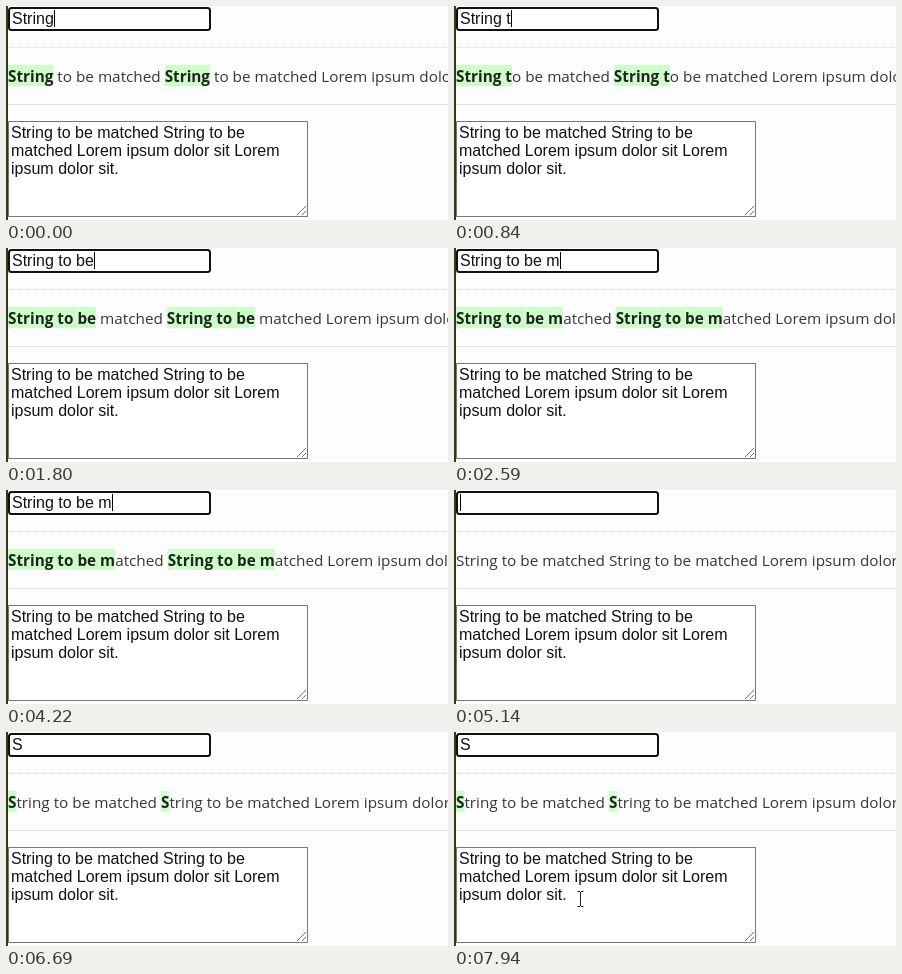
An HTML page with a canvas that plays this animation: 442 by 214 pixels, repeating every 7990 ms.

```html
<!DOCTYPE html>
<html lang="en">
<head>
<meta charset="utf-8">
<title>Live text highlight</title>
<style>
  html, body { margin: 0; width: 100%; height: 100%; overflow: hidden; background: #fdfcfe; }
  canvas { display: block; }
</style>
</head>
<body>
<canvas id="stage" width="442" height="214"></canvas>
<script>
const ctx = document.getElementById('stage').getContext('2d');
const W = 442, H = 214, LOOP = 7990, BLINK = 544;
const FIELD_FONT = '16px "Liberation Sans", Arial, sans-serif';
const PLAIN = '15.3px "Open Sans", sans-serif';
const BOLD = 'bold ' + PLAIN;
const TEXT = 'String to be matched String to be matched Lorem ipsum dolor sit Lorem ipsum dolor sit.';
const AREA_LINES = ['String to be matched String to be', 'matched Lorem ipsum dolor sit Lorem', 'ipsum dolor sit.'];

// Each keystroke: time and resulting field value
const KEYS = [
  [0, 'String'], [126, 'String '], [790, 'String t'], [1020, 'String to'],
  [1260, 'String to '], [1440, 'String to b'], [1710, 'String to be'],
  [1966, 'String to be '], [2590, 'String to be m'], [5140, ''], [6145, 'S']
];
const SELECT_FROM = 4560, SELECT_TO = 5140;

// Pointer path: time, x, y
const PATH = [[6980, 36, 214], [7140, 66, 198], [7300, 98, 180], [7480, 116, 172], [7939, 116, 172], [7940, 127, 167]];

function rect(color, x, y, w, h) {
  ctx.fillStyle = color;
  ctx.fillRect(x, y, w, h);
}

function write(str, x, y, font, color) {
  ctx.font = font;
  ctx.fillStyle = color;
  ctx.fillText(str, x, y);
  return ctx.measureText(str).width;
}

function line(color, width, ...points) {
  ctx.strokeStyle = color;
  ctx.lineWidth = width;
  ctx.beginPath();
  for (let i = 0; i < points.length; i += 4) {
    ctx.moveTo(points[i], points[i + 1]);
    ctx.lineTo(points[i + 2], points[i + 3]);
  }
  ctx.stroke();
}

function dottedRule(y, color) {
  ctx.setLineDash([1, 1]);
  line(color, 1, 2, y + 0.5, W, y + 0.5);
  ctx.setLineDash([]);
}

function roundBox(x, y, w, h, r, stroke, width) {
  ctx.beginPath();
  ctx.roundRect(x, y, w, h, r);
  ctx.fillStyle = '#fff';
  ctx.fill();
  ctx.strokeStyle = stroke;
  ctx.lineWidth = width;
  ctx.stroke();
}

function drawField(t, value, typedAt) {
  roundBox(3, 2, 201, 22, 2.5, '#111', 2);
  ctx.font = FIELD_FONT;
  const width = ctx.measureText(value).width;
  const selected = t >= SELECT_FROM && t < SELECT_TO;
  if (selected) rect('#0078d7', 6, 4, Math.round(width), 18);
  write(value, 6, 18, FIELD_FONT, selected ? '#fff' : '#111');
  const caretOn = Math.floor((t - typedAt) / BLINK) % 2 === 0;
  if (caretOn && !selected) rect('#000', Math.round(6 + width), 4, 1, 17);
}

function drawMatches(query) {
  const parts = query ? TEXT.split(query) : [TEXT];
  let x = 2;
  parts.forEach((part, i) => {
    if (i) {
      ctx.font = BOLD;
      rect('#ccffc8', x, 59, ctx.measureText(query).width, 21);
      x += write(query, x, 76, BOLD, '#222');
    }
    x += write(part, x, 76, PLAIN, '#383830');
  });
}

function drawArea() {
  roundBox(2.5, 115.5, 299, 95, 0, '#777', 1);
  AREA_LINES.forEach((str, i) => write(str, 5, 132 + i * 18, FIELD_FONT, '#111'));
  line('#777', 1, 291, 209, 300, 200, 296, 209, 300, 205);
}

function drawPointer(t) {
  const i = PATH.findLastIndex(p => t >= p[0]);
  if (i < 0) return;
  const a = PATH[i], b = PATH[i + 1] || a;
  const k = a === b ? 0 : (t - a[0]) / (b[0] - a[0]);
  const x = Math.round(a[1] + (b[1] - a[1]) * k) - 0.5;
  const y = Math.round(a[2] + (b[2] - a[2]) * k);
  line('#222', 1, x, y - 7, x, y + 7,
    x - 3, y - 7.5, x - 0.5, y - 7.5, x + 0.5, y - 7.5, x + 3, y - 7.5,
    x - 3, y + 7.5, x - 0.5, y + 7.5, x + 0.5, y + 7.5, x + 3, y + 7.5);
}

function draw(t) {
  const [typedAt, value] = KEYS.findLast(k => t >= k[0]);
  rect('#fdfcfe', 0, 0, W, H);
  rect('#38381c', 0, 0, 2, H);
  dottedRule(41, '#d6d6cc');
  rect('#e9e5c4', 2, 98, W - 2, 1);
  drawField(t, value, typedAt);
  drawMatches(value);
  drawArea();
  drawPointer(t);
}

const start = performance.now();
function tick() {
  draw((performance.now() - start) % LOOP);
  requestAnimationFrame(tick);
}
tick();
</script>
</body>
</html>
```
